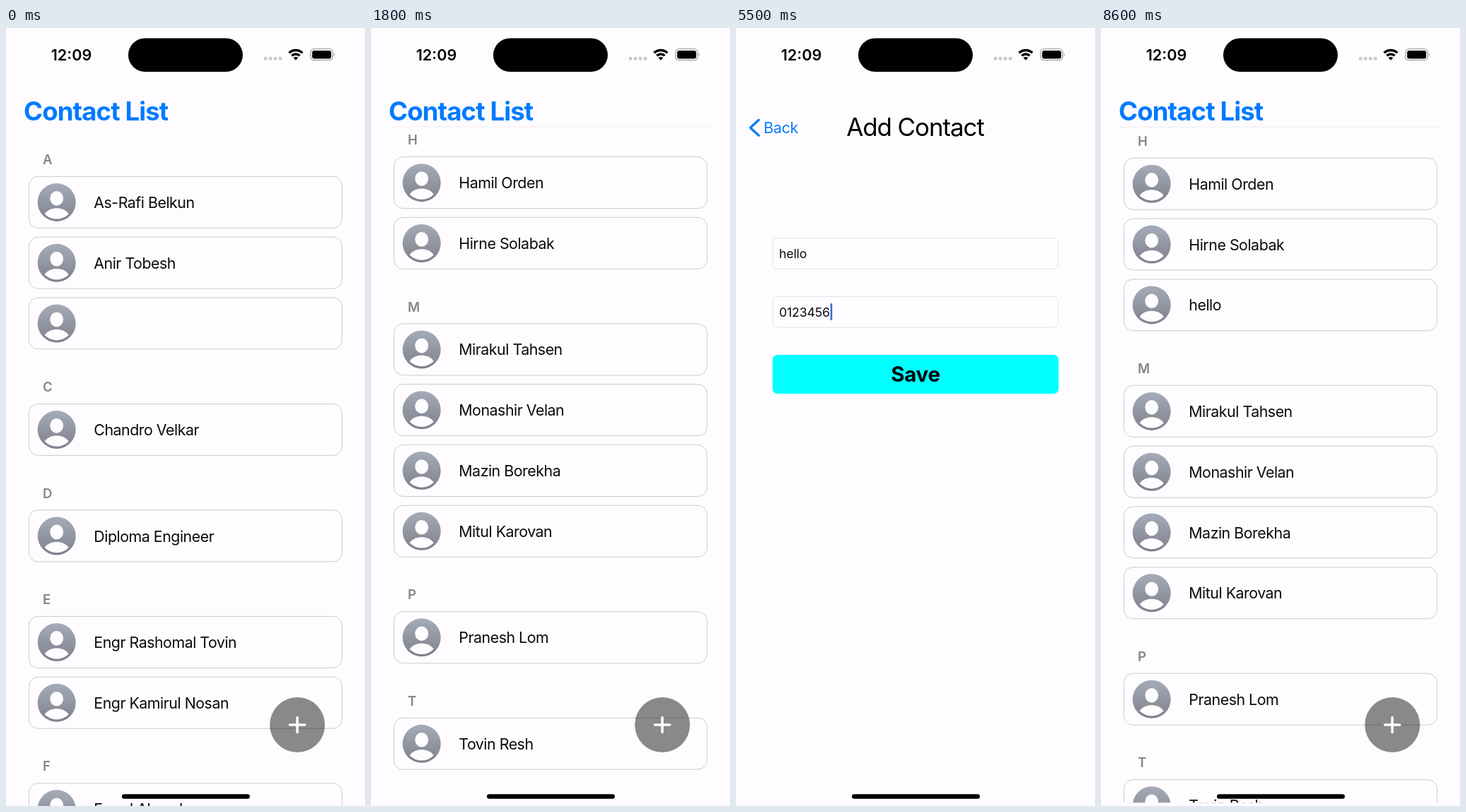
An HTML page for the animation above (8700 ms loop, 508 by 1102 pixels).

```html
<!DOCTYPE html>
<html lang="en">
<head>
<meta charset="utf-8">
<title>Contact List</title>
<style>
  html, body { margin: 0; width: 100%; height: 100%; overflow: hidden; background: #fefcff; }
  svg { display: block; width: 100vw; height: 100vh; }
  text { font-family: Inter, Roboto, "Liberation Sans", sans-serif; }
  .title { font-size: 36.6px; font-weight: 700; letter-spacing: -.9px; fill: #007aff; }
  .section { font-size: 18.6px; font-weight: 600; fill: #868589; }
  .name { font-size: 21.4px; letter-spacing: -.5px; fill: #0b0a0c; }
  .back { font-size: 21.6px; letter-spacing: -.4px; fill: #0a7cf8; }
  .heading { font-size: 35px; letter-spacing: -1.1px; text-anchor: middle; }
  .input { font-size: 17.7px; letter-spacing: -.15px; fill: #0b0a0c; }
  .input.empty { fill: #c3c1c6; letter-spacing: -.25px; }
  .save { font-size: 29.6px; font-weight: 700; letter-spacing: -.3px; text-anchor: middle; }
  .clock { font-size: 21.6px; font-weight: 600; text-anchor: middle; }
</style>
</head>
<body>
<svg viewBox="0 0 508 1102" preserveAspectRatio="none">
  <defs>
    <linearGradient id="shade" x1="0" y1="0" x2="0" y2="1">
      <stop offset="0" stop-color="#a5abb8"/><stop offset="1" stop-color="#7f818b"/>
    </linearGradient>
    <clipPath id="listArea"><rect y="139" width="508" height="963"/></clipPath>
    <g id="avatar">
      <circle r="27" fill="url(#shade)"/>
      <ellipse cy="-5.6" rx="9.4" ry="10.3" fill="#fefcff"/>
      <path d="M-17 16.5C-13 10.5-6.5 8.4 0 8.4S13 10.5 17 16.5A23.7 23.7 0 0 1-17 16.5Z" fill="#fefcff"/>
    </g>
    <g id="backButton">
      <path d="M32.2 130.2L20.2 141.2L32.2 152.2" fill="none" stroke="#0a7cf8" stroke-width="3.4" stroke-linecap="round" stroke-linejoin="round"/>
      <text class="back" x="39" y="149">Back</text>
    </g>
  </defs>
  <rect width="508" height="1102" fill="#fefcff"/>
  <text class="title" x="25" y="130.5">Contact List</text>
  <g id="list" clip-path="url(#listArea)"></g>
  <circle cx="412.3" cy="987" r="39" fill="#000" fill-opacity=".46"/>
  <path d="M401.7 987h21M412.2 976.5v21" stroke="#fff" stroke-width="3.6" stroke-linecap="round"/>

  <g id="addSheet">
    <rect width="508" height="1102" fill="#fefcff"/>
    <use href="#backButton"/>
    <text class="heading" x="253.5" y="153">Add Contact</text>
    <g fill="none" stroke="#e4e2e6">
      <rect x="52" y="297.5" width="404" height="44" rx="6.5"/>
      <rect x="52" y="380.5" width="404" height="43.5" rx="6.5"/>
    </g>
    <text id="nameInput" x="61" y="326"></text>
    <text id="numberInput" x="61" y="409"></text>
    <rect id="caret" width="2.6" height="24" rx="1.2" fill="#3a6bd8"/>
    <rect x="51.7" y="463" width="404.8" height="55" rx="7" fill="#0ff"/>
    <text class="save" x="254" y="501">Save</text>
  </g>

  <g id="detailSheet">
    <rect width="508" height="1102" fill="#fefcff"/>
    <rect y="93" width="508" height="1009" fill="#f5f4f8"/>
    <use href="#backButton"/>
    <use href="#avatar" transform="translate(254 290) scale(2)"/>
    <text class="name" x="254" y="392" text-anchor="middle">hello</text>
    <text class="name" x="254" y="430" text-anchor="middle">01234567890</text>
  </g>

  <text class="clock" x="92.5" y="45.6">12:09</text>
  <rect x="173" y="14.5" width="162" height="47.5" rx="23.7"/>
  <path d="M365 43.2h4.4m2.6 0h4.4m2.6 0h4.4m2.6 0h4.4" stroke="#c9c7cb" stroke-width="4.4"/>
  <g fill="none" stroke="#000" stroke-width="3.5">
    <path d="M400.6 35.2a13.6 13.6 0 0 1 18.8 0"/>
    <path d="M404.4 39.2a8.2 8.2 0 0 1 11.2 0"/>
  </g>
  <path d="M406.7 42.2a4.9 4.9 0 0 1 6.6 0L410 45.7Z"/>
  <rect x="431" y="29.7" width="31.4" height="16" rx="5" fill="none" stroke="#a5a3a7" stroke-width="1.3"/>
  <rect x="433.2" y="31.9" width="27" height="11.6" rx="3.2"/>
  <path d="M464 35.2q2.2 2.4 0 5Z" fill="#a5a3a7"/>
  <rect x="164" y="1085.2" width="181" height="6.6" rx="3.3"/>
</svg>
<script>
  const LOOP = 8700, STEP = 100, HEIGHT = 1102;
  const ROW = 85.8, SECTION_GAP = 64.7, PINNED = 157;
  const REST = -1036, OVERSHOOT = -1130.6;
  const KEY_DELAY = 150, NAME_START = 2800, NUMBER_START = 4600;
  const NEW_NAME = 'hello', NEW_NUMBER = '01234567890';
  const $ = id => document.getElementById(id);

  const sections = {
    A: ['As-Rafi Belkun', 'Anir Tobesh', ''],
    C: ['Chandro Velkar'],
    D: ['Diploma Engineer'],
    E: ['Engr Rashomal Tovin', 'Engr Kamirul Nosan'],
    F: ['Fored Almesh'],
    H: ['Hamil Orden', 'Hirne Solabak'],
    M: ['Mirakul Tahsen', 'Monashir Velan', 'Mazin Borekha', 'Mitul Karovan'],
    P: ['Pranesh Lom'],
    T: ['Tovin Resh']
  };

  // Remaining part of a critically damped spring, 1 down to 0.
  function decay(ms, rate = 19) {
    const u = Math.max(0, ms) / 1000 * rate;
    return (1 + u) * Math.exp(-u);
  }
  const smooth = p => {
    p = Math.min(1, Math.max(0, p));
    return p * p * (3 - 2 * p);
  };

  function scrollAt(t) {
    if (t < 1000) return 164 * smooth((t - 400) / 600);
    if (t < 1400) return 164 + (OVERSHOOT - 164) * smooth((t - 1000) / 400);
    return REST + (OVERSHOOT - REST) * decay(t - 1400, 15);
  }

  function sheetY(t, open, close) {
    if (t < open) return HEIGHT;
    const left = t < close ? decay(t - open) : 1 - decay(t - close);
    return left * HEIGHT < 0.6 ? 0 : left * HEIGHT;
  }

  function rowMarkup(name, y) {
    return `<rect x="32.5" y="${y}" width="443" height="73" rx="13" fill="none" stroke="#cbc9ce"/>
      <use href="#avatar" x="71.7" y="${y + 36.6}"/>
      <text class="name" x="124.3" y="${y + 44.6}">${name}</text>`;
  }

  function drawList(t) {
    let top = 210.3 + scrollAt(t), rows = '', headers = '';
    for (const [letter, names] of Object.entries(sections)) {
      const shown = letter === 'H' && t >= 6300 ? [...names, NEW_NAME] : names;
      shown.forEach((name, i) => {
        const y = top + i * ROW;
        if (y > 40 && y < HEIGHT) rows += rowMarkup(name, y);
      });
      const natural = top - 24.3;
      top += shown.length * ROW + SECTION_GAP;
      const y = Math.min(Math.max(natural, PINNED), top - 24.3 - 36);
      if (natural < PINNED) headers += `<rect x="26" y="${y - 18}" width="456" height="36.5" fill="#f6f5f7"/>`;
      headers += `<text class="section" x="52" y="${y + 7}">${letter}</text>`;
    }
    $('list').innerHTML = rows + headers;
  }

  const typed = (text, start, t) =>
    text.slice(0, Math.max(0, Math.floor((t - start) / KEY_DELAY) + 1));

  function setInput(id, value, hint) {
    $(id).textContent = value || hint;
    $(id).setAttribute('class', value ? 'input' : 'input empty');
    return value ? $(id).getComputedTextLength() + 1 : 0;
  }

  function drawForm(t) {
    const nameWidth = setInput('nameInput', typed(NEW_NAME, NAME_START, t), 'Add name');
    const numberWidth = setInput('numberInput', typed(NEW_NUMBER, NUMBER_START, t), 'Add number');
    const onNumber = t >= 4400;
    const lastKey = t < NAME_START ? 2200 : NAME_START + (NEW_NAME.length - 1) * KEY_DELAY;
    const visible = onNumber ? t < 6200 : t >= 2200 && (t < lastKey || (t - lastKey) % 1000 < 500);
    $('caret').setAttribute('x', 60.7 + (onNumber ? numberWidth : nameWidth));
    $('caret').setAttribute('y', onNumber ? 390 : 307.3);
    $('caret').setAttribute('visibility', visible ? 'visible' : 'hidden');
  }

  function place(id, y) {
    $(id).setAttribute('transform', `translate(0 ${y})`);
  }

  function draw(t) {
    drawList(t);
    drawForm(t);
    place('addSheet', sheetY(t, 1800, 6400));
    place('detailSheet', sheetY(t, 7150, 8200));
  }

  const start = performance.now();
  let shownStep = -1;
  function tick() {
    const step = Math.floor((performance.now() - start) % LOOP / STEP);
    if (step !== shownStep) draw((shownStep = step) * STEP);
    requestAnimationFrame(tick);
  }
  tick();
</script>
</body>
</html>
```
